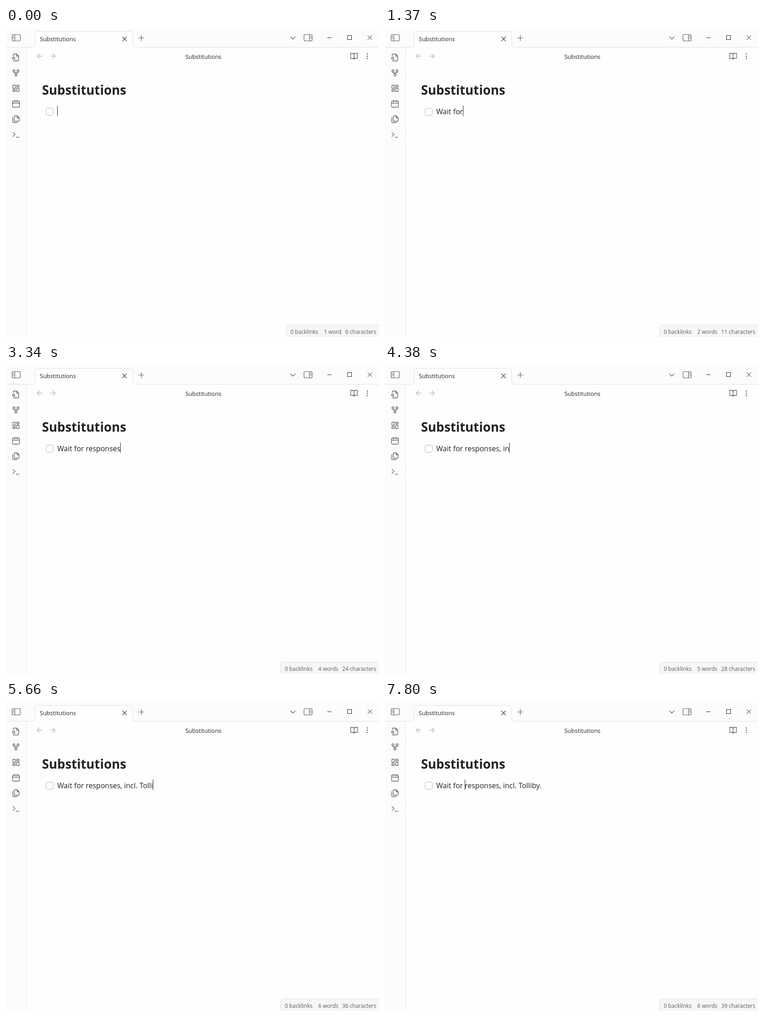
An HTML page for the animation above (8 s loop, 823 px wide and 681 px high).

```html
<!DOCTYPE html>
<html lang="en">
<head>
<meta charset="utf-8">
<title>Substitutions</title>
<style>
  html, body { margin: 0; width: 100%; height: 100%; overflow: hidden; background: #fefefe; }
  svg { display: block; width: 823px; height: 681px; }
  text { font-family: "Open Sans", "Noto Sans", sans-serif; font-size: 13px; fill: #222; white-space: pre; }
  #heading { font-size: 27.8px; font-weight: 700; }
  #note { font-size: 16px; }
  #status text { font-size: 12px; fill: #5c5c5c; text-anchor: end; }
  .icon { fill: none; stroke: #5f5f5f; stroke-width: 1.75; stroke-linecap: round; stroke-linejoin: round; }
  .thin { fill: none; stroke: #5f5f5f; stroke-width: 1.2; stroke-linecap: round; stroke-linejoin: round; }
  .window { fill: none; stroke: #222; }
  .faded { stroke: #b9b9b9; }
</style>
</head>
<body>
<svg viewBox="0 0 823 681">
  <rect width="823" height="43" fill="#fcfcfc"/>
  <rect y="43" width="45" height="638" fill="#fcfcfc"/>
  <path d="M45.5 43V681" stroke="#e4e4e4"/>
  <path d="M-1 42.5H58.5q6 0 6-6V13.5q0-6 6-6H273.5q6 0 6 6V36.5q0 6 6 6H824" fill="#fefefe" stroke="#e0e0e0"/>

  <g class="thin">
    <rect x="13.5" y="14.5" width="18" height="14" rx="2.5"/>
    <path d="M19.5 14.5v14M15.7 18h1.6M15.7 20.5h1.6M15.7 23h1.6"/>
    <rect x="657.5" y="14.5" width="18" height="14" rx="2.5"/>
    <path d="M669.5 14.5v14M671.7 18h1.6M671.7 20.5h1.6M671.7 23h1.6"/>
    <path d="M257 19.5l9 9m0-9l-9 9" stroke="#444"/>
    <path d="M292.5 22h12M298.5 16v12M628 19.5l5 5 5-5"/>
  </g>
  <g class="window">
    <path d="M709 21.5h9M798 16.5l9.5 9.5m0-9.5l-9.5 9.5"/>
    <rect x="753.5" y="16.5" width="9" height="9"/>
  </g>

  <g class="icon">
    <g transform="translate(13 56) scale(.75)">
      <path d="M4 22h14a2 2 0 0 0 2-2V7.5L14.5 2H6a2 2 0 0 0-2 2v3M14 2v6h6M9 18l-1.5-1.5"/>
      <circle cx="5" cy="14" r="3"/>
    </g>
    <g transform="translate(13 90) scale(.75)">
      <circle cx="12" cy="18" r="3"/><circle cx="6" cy="6" r="3"/><circle cx="18" cy="6" r="3"/>
      <path d="M18 9v1a2 2 0 0 1-2 2H8a2 2 0 0 1-2-2V9M12 12v3"/>
    </g>
    <path transform="translate(13 124) scale(.75)" d="M3 3h7v9H3zM14 3h7v5h-7zM14 12h7v9h-7zM3 16h7v5H3z"/>
    <g transform="translate(13 158) scale(.75)">
      <rect x="2" y="4" width="20" height="18" rx="2"/><path d="M16 2v4M8 2v4M2 10h20"/>
    </g>
    <path transform="translate(13 192) scale(.75)" d="M15.5 2H9a2 2 0 0 0-2 2v12a2 2 0 0 0 2 2h10.500a2 2 0 0 0 2-2V8zM15.500 2v6h6M2.500 7v13a2 2 0 0 0 2 2h11"/>
    <path transform="translate(13 226) scale(.75)" d="M3 5.500l6.500 6-6.500 6M12 19.500h9"/>
    <path class="faded" transform="translate(65 53) scale(.75)" d="M12 19l-7-7 7-7M19 12H5"/>
    <path class="faded" transform="translate(94.5 53) scale(.75)" d="M12 19l7-7-7-7M5 12h14"/>
    <path transform="translate(759 53.5) scale(.75)" d="M2 3h6a4 4 0 0 1 4 4v14a3 3 0 0 0-3-3H2zM22 3h-6a4 4 0 0 0-4 4v14a3 3 0 0 1 3-3h7z"/>
  </g>
  <path d="M797.3 57.3h0m0 5h0m0 5h0" stroke="#5f5f5f" stroke-width="2.8" stroke-linecap="round"/>

  <text x="74.5" y="29">Substitutions</text>
  <text x="435.5" y="68" text-anchor="middle">Substitutions</text>
  <text id="heading" x="79.5" y="147">Substitutions</text>
  <rect x="88.5" y="176.5" width="16" height="16" rx="4" fill="#fff" stroke="#b4b4b4"/>
  <text id="note" x="113" y="190"></text>
  <rect id="caret" y="171" width="1" height="23" fill="#222"/>

  <path id="panel" fill="#f6f6f6" stroke="#e0e0e0"/>
  <g id="status">
    <text y="674"></text><text y="674"></text><text y="674"></text>
  </g>
</svg>
<script>
const LOOP = 8000;
const PREFIX = 6;  // the hidden "- [ ] " counts as characters too
const LAG = 200;   // the counter trails the typing
const BLINK = 540;

// Bursts of typing: text, time of its first key, time of its last key.
const bursts = [
  ["W", 410, 410], ["ait ", 640, 1000], ["for", 1180, 1370], [" respo", 1520, 2090],
  ["nse", 2640, 2790], ["s", 3130, 3130], [", in", 3880, 4160], ["cl. ", 4410, 4770],
  ["Tolli", 4990, 5610], ["by", 5860, 5990], [".", 6810, 6810]
];
const keys = bursts.flatMap(([text, from, to]) =>
  [...text].map((char, i) => ({ char, at: from + (to - from) * i / Math.max(1, text.length - 1) })));

// Home, then two steps to the right by word.
const moves = [{ at: 7270, index: 0 }, { at: 7620, index: 4 }, { at: 7800, index: 9 }];

// While the counter shows the saved note: from, to, its length.
const saved = [[1390, 2160, 0], [7480, LOOP, 33]];

const get = id => document.getElementById(id);
const note = get("note"), caret = get("caret"), panel = get("panel");
const items = [...get("status").children];

const until = (list, t) => list.filter(({ at }) => at <= t);
const typedAt = t => until(keys, t).map(key => key.char).join("");

function drawCaret(t, length) {
  const index = until(moves, t).pop()?.index ?? length;
  const offset = index ? note.getSubStringLength(0, index) : 0;
  caret.setAttribute("x", Math.round(113 + offset));
  const last = until([...keys, ...moves], t).pop()?.at ?? 0;
  const off = Math.floor((t - last) / BLINK) % 2;
  caret.setAttribute("visibility", off ? "hidden" : "visible");
}

// Labels are placed from right to left, and the panel grows to fit them.
function drawStatus(t) {
  const stale = saved.find(([from, to]) => t >= from && t < to);
  const text = stale ? typedAt(t).slice(0, stale[2]) : typedAt(t - LAG);
  const words = 1 + (text.match(/\S+/g) || []).length;
  const labels = [`${text.length + PREFIX} characters`, `${words} word${words > 1 ? "s" : ""}`, "0 backlinks"];
  const gaps = [8.5, 12.5, 9.5];
  let x = 817;
  items.forEach((item, i) => {
    item.textContent = labels[i];
    item.setAttribute("x", x);
    x -= item.getComputedTextLength() + gaps[i];
  });
  const left = Math.round(x) + 0.5;
  panel.setAttribute("d", `M${left} 682V662.5q0-8 8-8H824V682z`);
}

function draw(t) {
  const text = typedAt(t);
  note.textContent = text;
  drawCaret(t, text.length);
  drawStatus(t);
}

const start = performance.now();
function tick() {
  draw((performance.now() - start) % LOOP);
  requestAnimationFrame(tick);
}
tick();
</script>
</body>
</html>
```
